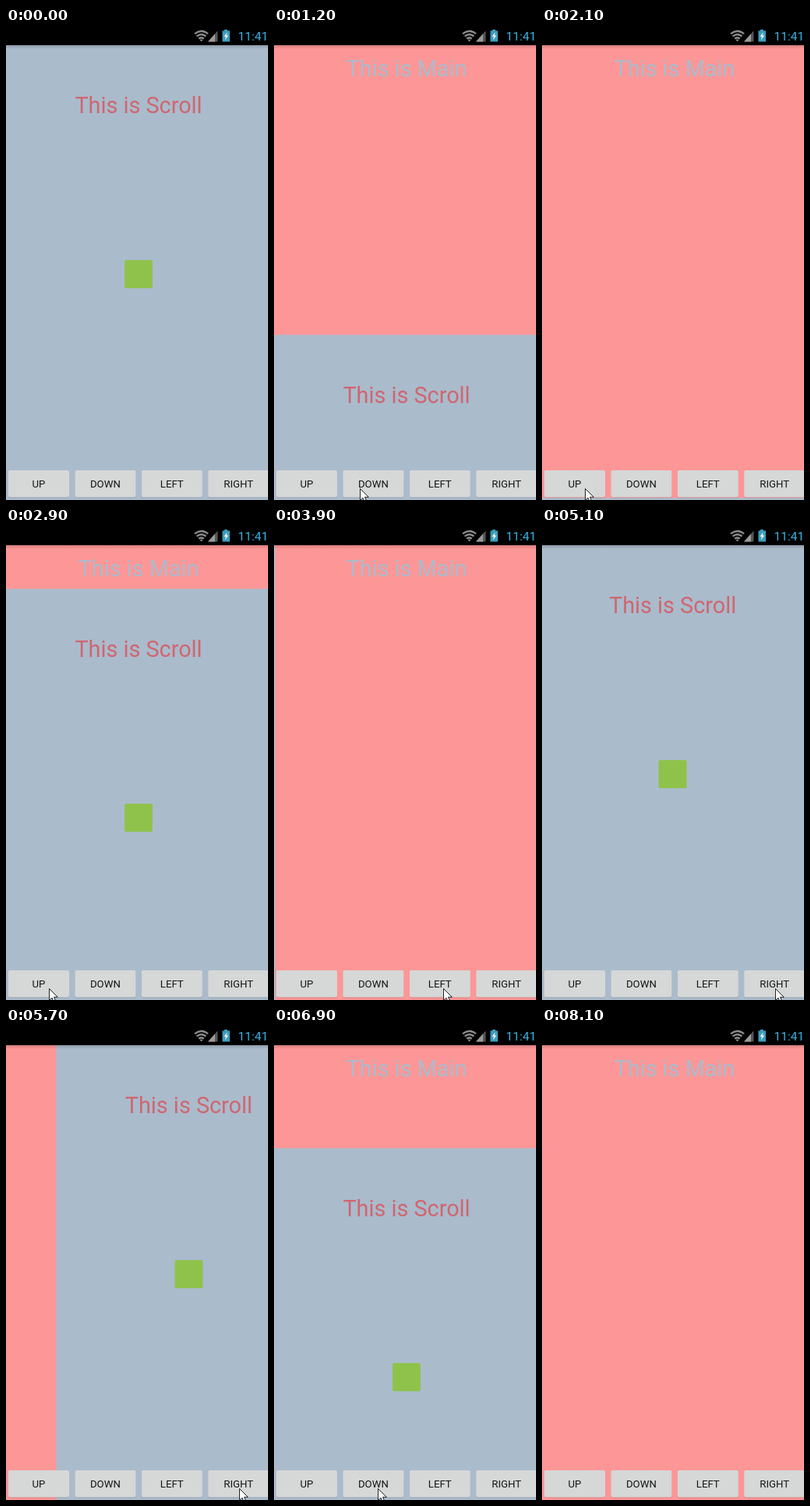
Write an HTML page that moves like this. It is 336 px wide and 604 px high and loops after 8400 ms.

```html
<!DOCTYPE html>
<html lang="en">
<head>
<meta charset="utf-8">
<title>Scroll panel demo</title>
<style>
  html, body { margin: 0; width: 100%; height: 100%; overflow: hidden; background: #000; }
  svg { display: block; width: 336px; height: 604px; font-family: Roboto, "Open Sans", sans-serif; }
  .title { font-size: 28.8px; text-anchor: middle; }
  .label { font-size: 13.2px; text-anchor: middle; fill: #161616; }
</style>
</head>
<body>
<svg viewBox="0 0 336 604">
  <defs>
    <linearGradient id="shade" x2="0" y2="1">
      <stop offset="0" stop-opacity=".16"/>
      <stop offset="1" stop-opacity="0"/>
    </linearGradient>
  </defs>

  <rect y="22" width="336" height="582" fill="#fd9696"/>
  <text class="title" x="170" y="62" fill="#aabbcc">This is Main</text>

  <g id="panel">
    <rect y="22" width="340" height="584" fill="#aabbcc"/>
    <text class="title" x="170" y="109" fill="#d0666f">This is Scroll</text>
    <rect x="152" y="297" width="36" height="36" rx="2" fill="#8fc24b"/>
  </g>

  <g id="buttons"></g>

  <rect y="22" width="336" height="5" fill="url(#shade)"/>
  <rect width="336" height="22" fill="#000"/>
  <path d="M242 7.400Q250.500 .6 259 7.400M244.600 10.600Q250.500 6 256.400 10.600M247.200 13.600Q250.500 11.200 253.800 13.600"
        fill="none" stroke="#8c8c8c" stroke-width="2.4"/>
  <path d="M248.300 14.800h4.400l-2.200 2.800z" fill="#8c8c8c"/>
  <path d="M259 17.500L271.500 3.500V17.500z" fill="#555"/>
  <path d="M259 17.500L268 7.400V17.500z" fill="#9a9a9a"/>
  <path d="M280 2h4v1.500h3v14h-9.500v-14h2.500z" fill="#3c9dbb"/>
  <path d="M283.600 5.500l-4 5.500h2.300l-1 4.500 4.300-6h-2.400z" fill="#fff"/>
  <text x="297.500" y="16" font-size="15.500" fill="#33b5e5">11:41</text>

  <path id="cursor" d="M.5 .5V15.500L4 12.200L6.500 18L9 17L6.500 11.300H11.300z"
        fill="#fff" stroke="#222" stroke-linejoin="round"/>
</svg>
<script>
const LOOP = 8400, STEP = 100, W = 340, H = 582, ROW = 589;
const panel = document.getElementById('panel');
const cursor = document.getElementById('cursor');

document.getElementById('buttons').innerHTML = ['UP', 'DOWN', 'LEFT', 'RIGHT'].map((name, i) => {
  const x = 3 + i * 85.4;
  return `<rect x="${x}" y="567" width="78" height="34.5" rx="2" opacity=".14"/>
    <rect x="${x}" y="566" width="78" height="34.5" rx="2" fill="#d6d7d7"/>
    <text class="label" x="${x + 39}" y="588">${name}</text>`;
}).join('');

// Each move brings the panel in from an edge, or sends it out there
const moves = [
  { start: 870,  dur: 1700, edge: [0, H],  out: true },
  { start: 2540, dur: 1000, edge: [0, H] },
  { start: 3878, dur: 1800, edge: [-W, 0] },
  { start: 5342, dur: 1300, edge: [W, 0] },
  { start: 6758, dur: 1500, edge: [0, H],  out: true }
];

// Pointer hops between buttons; sag dips the path below the stage
const entry = { x: 264, y: 267 };
const hops = [
  { leave: 200,  reach: 700,  x: 110, y: ROW },
  { leave: 1800, reach: 2100, x: 55,  y: ROW },
  { leave: 3000, reach: 3600, x: 217, y: ROW, sag: 25 },
  { leave: 4500, reach: 4800, x: 299, y: ROW },
  { leave: 5800, reach: 6500, x: 133, y: ROW, sag: 110 },
  { leave: 7500, reach: 8000, x: 322, y: 376 }
];

// Slow start, fast middle, long tail
function viscous(p) {
  const x = 8 * p, k = Math.exp(-1);
  return x < 1 ? x - 1 + Math.exp(-x) : k + (1 - k) * (1 - Math.exp(1 - x));
}
const smooth = p => p * p * (3 - 2 * p);
const clamp = v => Math.min(1, Math.max(0, v));
const mix = (a, b, p) => a + (b - a) * p;
const stepDown = t => Math.floor(t / STEP) * STEP;
const place = (el, x, y) => el.setAttribute('transform', `translate(${x.toFixed(1)} ${y.toFixed(1)})`);

function movePanel(t) {
  // a move takes over on the step in which it starts
  const m = moves.findLast(v => stepDown(v.start) <= t) || moves[0];
  const p = viscous(clamp((t - m.start) / m.dur)) / viscous(1);
  const away = m.out ? p : 1 - p;
  const [x, y] = m.edge.map(d => d * away);
  // the last pixel snaps shut
  place(panel, x, H - y < 1 ? H + 4 : y);
}

function movePointer(t) {
  const i = hops.findLastIndex(h => h.leave <= t);
  const shown = i >= 0 && t <= hops.at(-1).reach;
  cursor.style.display = shown ? '' : 'none';
  if (!shown) return;
  const a = hops[i - 1] || entry, b = hops[i];
  const p = smooth(clamp((t - b.leave) / (b.reach - b.leave)));
  place(cursor, mix(a.x, b.x, p), mix(a.y, b.y, p) + (b.sag || 0) * Math.sin(Math.PI * p));
}

const begin = performance.now();
function tick() {
  const t = stepDown((performance.now() - begin) % LOOP);
  movePanel(t);
  movePointer(t);
  requestAnimationFrame(tick);
}
tick();
</script>
</body>
</html>
```
